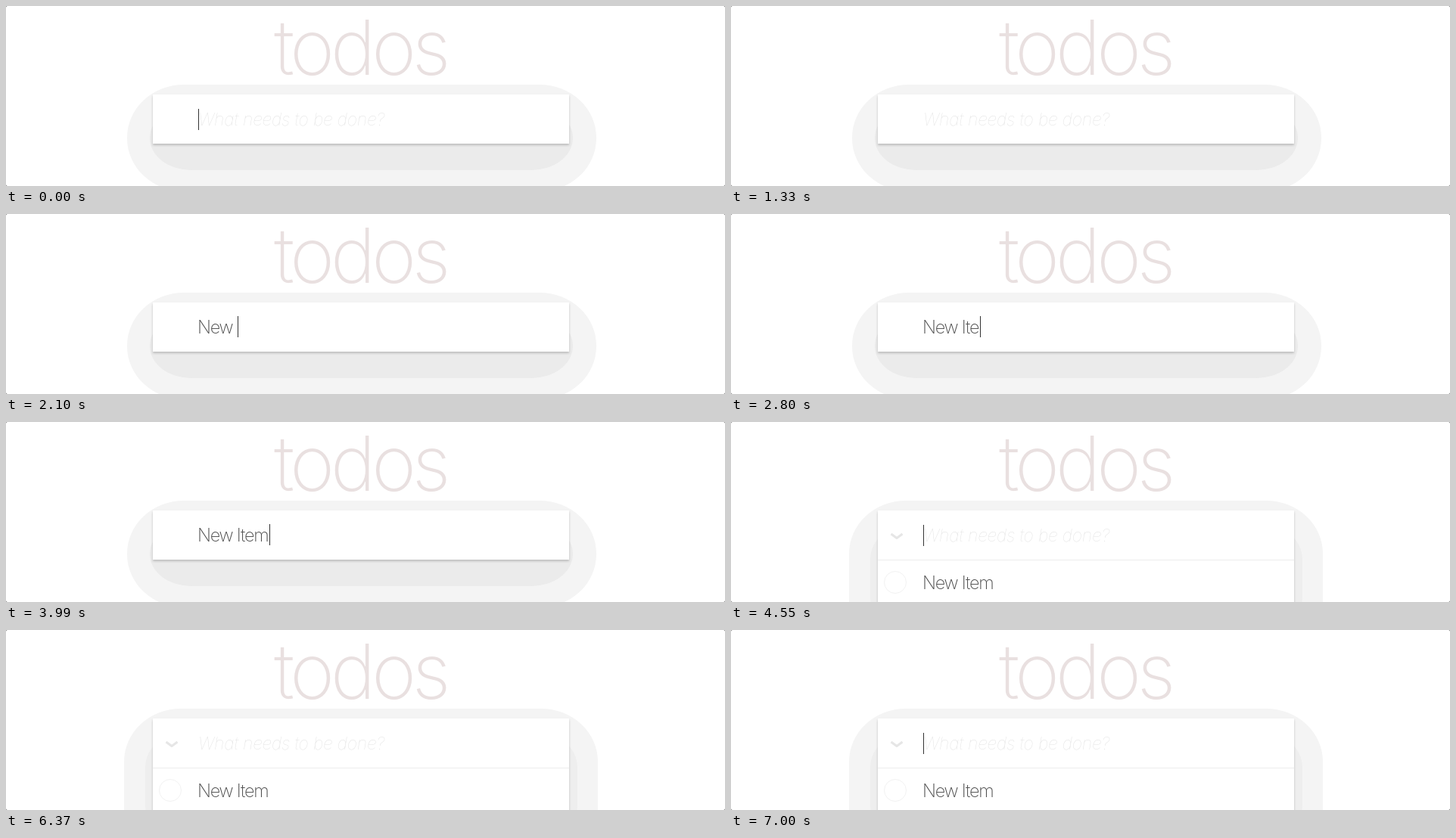
These frames come from a looping animation (950 px wide and 238 px high, 7.14 s). An HTML page:

```html
<!DOCTYPE html>
<html lang="en">
<head>
<meta charset="utf-8">
<title>todos</title>
<style>
  html, body { margin: 0; width: 100%; height: 100%; overflow: hidden; background: #666; }
  svg { display: block; background: #fff; border-radius: 2px; font: 200 23.5px Inter, sans-serif; letter-spacing: -1.25px; fill: #4d4d4d; }
  #title { font-size: 101px; font-weight: 150; letter-spacing: -5.5px; fill: #e9e0e0; }
  #hint { font-size: 23px; font-weight: 100; font-style: italic; letter-spacing: -.25px; fill: #e2e2e2; }
  #caret { fill: #333; }
  .card { fill: #fff; filter: drop-shadow(0 2px 1.5px rgba(0, 0, 0, .2)); }
  .outer { fill: #f4f4f4; }
  .inner { fill: #ebebeb; }
  #list .inner { fill: #eee; }
  .line { fill: none; stroke: #ededed; }
  circle.line { stroke: #f2f2f2; }
  text { white-space: pre; }
</style>
</head>
<body>
<svg width="950" height="238" viewBox="0 0 950 238">
  <text id="title" x="354" y="91">todos</text>
  <g id="empty">
    <rect class="outer" x="160" y="104" width="620" height="141" rx="75" ry="70"/>
    <rect class="inner" x="190" y="132" width="559" height="85" rx="55" ry="42"/>
    <rect class="card" x="194" y="117" width="550" height="65"/>
  </g>
  <g id="list">
    <rect class="outer" x="156" y="104" width="626" height="206" rx="75" ry="70"/>
    <rect class="inner" x="184" y="132" width="571" height="150" rx="60" ry="50"/>
    <rect class="card" x="194" y="117" width="550" height="131"/>
    <path class="line" d="M194 182.5H744"/>
    <circle class="line" cx="217" cy="212" r="14.5"/>
    <path d="M211.5 148l7.5 5.5 7.5-5.5" fill="none" stroke="#e6e6e6" stroke-width="3" stroke-linejoin="round"/>
    <text x="253" y="221">New Item</text>
  </g>
  <text id="hint" x="254" y="158">What needs to be done?</text>
  <text id="typed" x="253" y="158"></text>
  <rect id="caret" width="1" height="28"/>
</svg>
<script>
  const LOOP = 7140, TEXT = 'New Item', SUBMIT = 4550;
  const keyTimes = [1610, 1820, 1960, 2100, 2520, 2730, 2800, 2940];
  const caretX = [254, 269, 281, 300, 306, 310, 316, 329, 348];
  const caretOff = [[280, 770], [1330, 1610], [3500, 3990], [5040, 5600], [6090, 6650]];
  const $ = id => document.getElementById(id);
  const show = (id, on) => $(id).setAttribute('visibility', on ? 'visible' : 'hidden');

  function draw(now) {
    const t = now % LOOP;
    const submitted = t >= SUBMIT;
    const count = submitted ? 0 : keyTimes.filter(k => t >= k).length;
    show('empty', !submitted);
    show('list', submitted);
    show('hint', !count);
    show('caret', !caretOff.some(([from, to]) => t >= from && t < to));
    $('typed').textContent = TEXT.slice(0, count);
    $('caret').setAttribute('x', caretX[count]);
    $('caret').setAttribute('y', count ? 135 : 136);
    requestAnimationFrame(draw);
  }
  draw(0);
</script>
</body>
</html>
```
